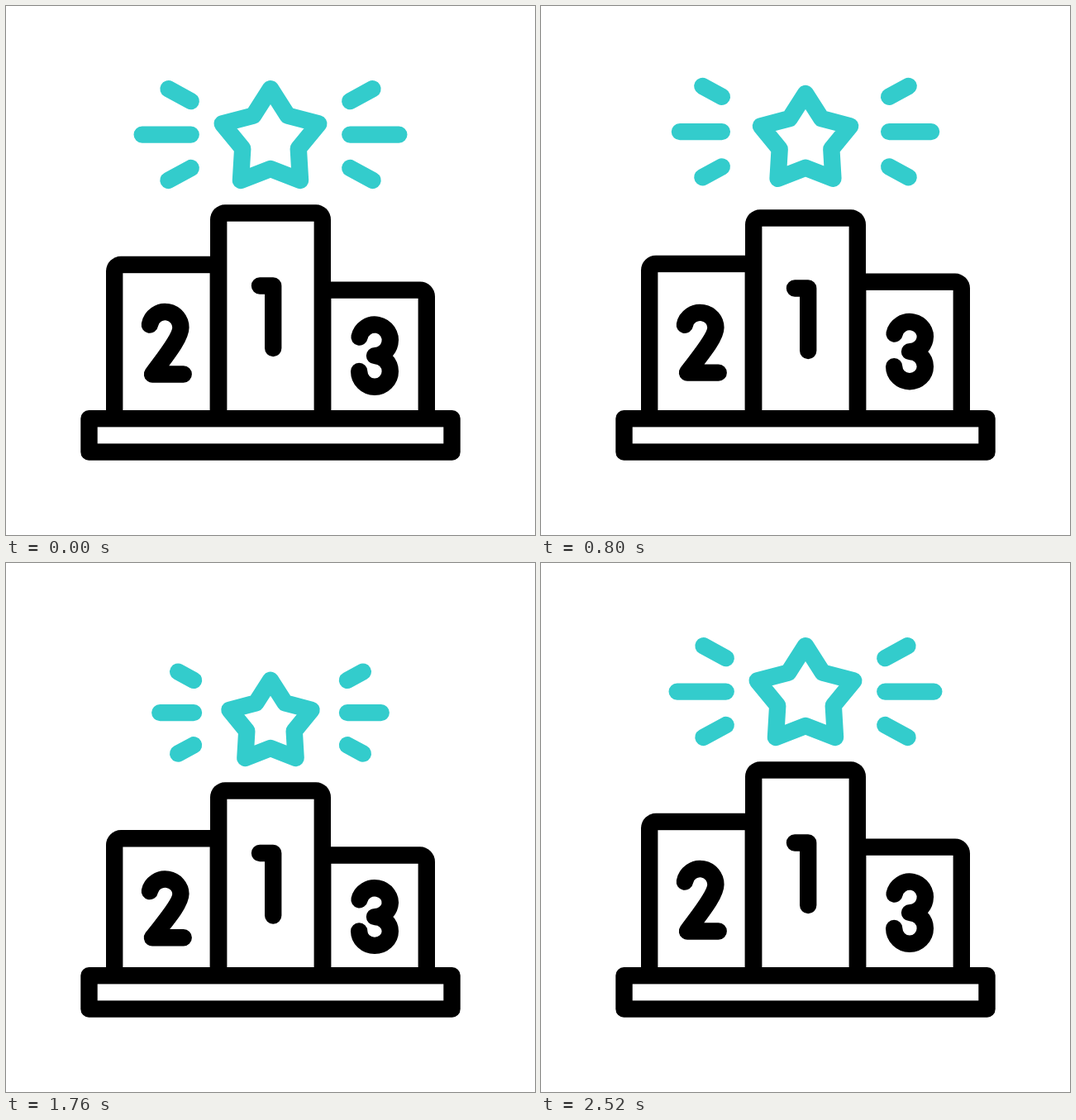
Animation, 640 px wide and 640 px high, one loop 2880 ms. Source, as an HTML page with a canvas:

```html
<!DOCTYPE html>
<html lang="en">
<head>
<meta charset="utf-8">
<title>Winners' podium</title>
<style>
  html, body { margin: 0; width: 100%; height: 100%; overflow: hidden; background: #fff; }
  canvas { display: block; width: 640px; height: 640px; }
</style>
</head>
<body>
<canvas id="stage" width="640" height="640"></canvas>
<script>
const ctx = document.getElementById('stage').getContext('2d');
const LOOP = 2880, STEP = 20, STROKE = 20.4;
const BLACK = '#000', TEAL = '#33cccc', WHITE = '#fff';
const { PI, sin, cos } = Math;

// Eased progress from 0 to 1 between two times.
function ease(t, from, to) {
  const k = Math.min(1, Math.max(0, (t - from) / (to - from)));
  return k * k * (3 - 2 * k);
}

// A jump crouches, rises, hangs, lands back in the crouch, rebounds and
// settles at zero. The returned function blends the pose values at time t.
function jump({ start, crouched, top, drop, fall }) {
  const landed = drop + fall, rebound = landed + fall, settled = rebound + fall + 200;
  return (t, crouch, hang, spring) =>
    crouch * ease(t, start, crouched) +
    (hang - crouch) * (ease(t, crouched, top) - ease(t, drop, landed)) +
    (spring - crouch) * ease(t, landed, rebound) -
    spring * ease(t, rebound, settled);
}

const leader = { start: 240, crouched: 540, top: 1160, drop: 1480, fall: 280 };
const first = jump(leader);
const second = jump({ start: 200, crouched: 440, top: 1140, drop: 1460, fall: 240 });
const third = jump({ start: 200, crouched: 400, top: 1060, drop: 1420, fall: 240 });

// The star and its rays follow the middle column, each rising at its own pace.
const quick = jump({ ...leader, start: 390, top: 860 });
const medium = jump({ ...leader, top: 1060 });
const slow = jump({ ...leader, start: 390, top: 1380 });

function strokePath(color, build) {
  ctx.beginPath();
  build();
  ctx.strokeStyle = color;
  ctx.stroke();
}

function frame(x, y, w, h, radii) {
  ctx.fillStyle = BLACK;
  ctx.beginPath();
  ctx.roundRect(x, y, w, h, radii);
  ctx.fill();
  ctx.fillStyle = WHITE;
  ctx.fillRect(x + STROKE, y + STROKE, w - 2 * STROKE, h - 2 * STROKE);
}

function column(x, top, left, right) {
  frame(x, top, 146, 510 - top, [left, right, 0, 0]);
}

// Squeezes a digit's centre line vertically, leaving the stroke width alone.
function digit(centerY, dy, shrink, build) {
  strokePath(BLACK, () => {
    ctx.save();
    ctx.translate(0, centerY + dy);
    ctx.scale(1, 1 - shrink / 75);
    ctx.translate(0, -centerY);
    build();
    ctx.restore();
  });
}

function one() {
  ctx.moveTo(307, 338.5);
  ctx.lineTo(323.2, 338.5);
  ctx.lineTo(323.2, 414);
}

function two() {
  ctx.arc(192.5, 389, 18.9, PI + 0.18, 0);
  ctx.bezierCurveTo(211.4, 402, 191, 426, 177, 445.5);
  ctx.lineTo(214.7, 445.5);
}

function three() {
  ctx.arc(446, 404.3, 18.8, PI + 0.2, PI / 2);
  ctx.arc(446, 441.9, 18.8, -PI / 2, PI);
}

// A regular star standing on its two lower tips.
function star(bottom, size) {
  const outer = 61.3 * size, inner = 35.5 * size;
  const center = bottom - outer * cos(PI / 5);
  strokePath(TEAL, () => {
    for (let i = 0; i < 10; i++) {
      const r = i % 2 ? inner : outer, a = i * PI / 5;
      ctx.lineTo(320 + r * sin(a), center - r * cos(a));
    }
    ctx.closePath();
  });
}

// Three rays per side, pushed outwards and stretched together.
function rays(y, push, stretch) {
  strokePath(TEAL, () => {
    for (const side of [-1, 1]) {
      for (const dir of [-1, 0, 1]) {
        const x = 320 + side * (96.3 + push);
        const startY = y + dir * (40.5 + 0.38 * push);
        const length = dir ? 27.2 : 59;
        ctx.moveTo(x, startY);
        ctx.lineTo(x + side * length * stretch, startY + dir * 14.8 * stretch);
      }
    }
  });
}

function draw(t) {
  ctx.fillStyle = WHITE;
  ctx.fillRect(0, 0, 640, 640);
  ctx.lineWidth = STROKE;
  ctx.lineCap = ctx.lineJoin = 'round';

  const y1 = first(t, 25, -25, -4);
  const y2 = second(t, 25, -25, -5);
  const y3 = third(t, 19, -25, -5);

  column(121, 302.8 + y2, 18, 0);
  column(373, 333.4 + y3, 0, 18);
  column(247, 240.3 + y1, 18, 18);
  frame(90.3, 489, 459.4, 60.8, 10);

  digit(376, y1 / 2, 0, one);
  digit(407.8, y2 / 2, second(t, 5.5, 0, 0), two);
  digit(423.1, y3 / 2, third(t, 9, 0, 0), three);

  star(211 + y1 + quick(t, 0, -9, 0), 1 + slow(t, -0.15, 0.19, 0.095));
  rays(155.6 + y1 + medium(t, 0.5, -19.5, 0),
    quick(t, -3.3, 5.7, 14.7), 1 + quick(t, -0.31, -0.12, 0.14));
}

const begin = performance.now();
function tick() {
  const t = (performance.now() - begin) % LOOP;
  draw(Math.floor(t / STEP) * STEP);
  requestAnimationFrame(tick);
}
tick();
</script>
</body>
</html>
```
